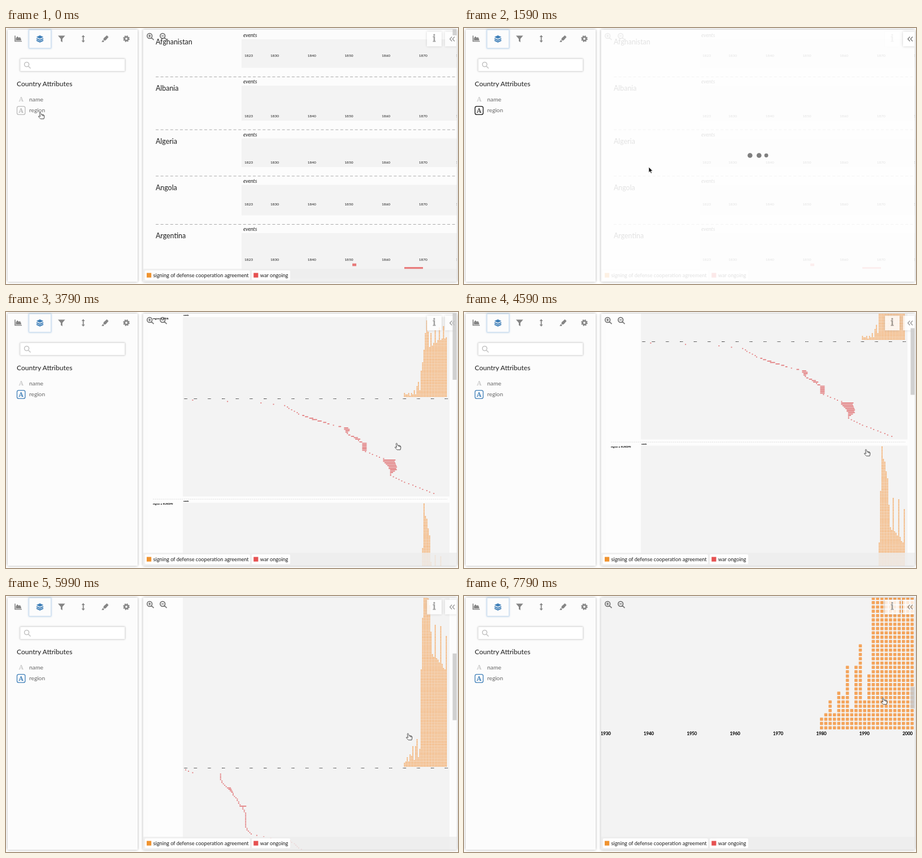
These frames come from a looping animation (800x453 px, 7.99 s). An HTML page:

```html
<!DOCTYPE html>
<html lang="en">
<head>
<meta charset="utf-8">
<title>Event timeline explorer</title>
<style>
html, body { margin: 0; width: 100%; height: 100%; overflow: hidden; background: #fff; }
svg { display: block; width: 800px; height: 453px; font-family: Quicksand, Lato, sans-serif; fill: #1c1c1c; }
.pane { fill: #fcfcfc; filter: drop-shadow(0 0 2px rgba(0,0,0,.33)); }
.button { fill: #fff; filter: drop-shadow(0 0 2px rgba(0,0,0,.2)); }
.glow { fill: #fcfcfc; stroke: #d0e1f1; filter: drop-shadow(0 0 1.5px rgba(70,135,200,.5)); }
.field { fill: #fff; stroke: #e2e2e2; filter: drop-shadow(0 0 1.5px rgba(0,0,0,.22)); }
.icon { fill: #858585; }
.line { fill: none; stroke: #858585; stroke-width: 1.6; }
.panel { fill: #f3f3f3; }
.axis { text-anchor: middle; }
.events { font-style: italic; }
.fine text { fill: #000; stroke: #000; stroke-width: .1; }
.dash { stroke: #aaa; fill: none; }
.tag { fill: #f6f6f6; stroke: #d8d8d8; stroke-width: .8; }
.letter { font: 700 11.5px "Noto Serif", serif; text-anchor: middle; }
</style>
</head>
<body>
<svg viewBox="0 0 800 453">
  <defs>
    <clipPath id="view"><rect x="243" y="3" width="555" height="446"/></clipPath>
    <clipPath id="stage"><rect width="797" height="449"/></clipPath>
  </defs>

  <rect class="pane" x="3" y="3" width="230" height="446" rx="1"/>
  <rect class="glow" x="40.8" y="3.3" width="38.8" height="32.4"/>
  <g class="icon">
    <path d="M17.5 22v-4l2.6-3.2 2.6 2.5 2-1.4 2 3.6v2.5z"/>
    <path class="line" d="M16 13.5v10h12"/>
    <g fill="#3f7fb8">
      <path d="M60 13l6.3 3-6.3 3-6.3-3z"/>
      <path d="M54 18.9l6 2.8 6-2.8M54 21.9l6 2.8 6-2.8" fill="none" stroke="#3f7fb8" stroke-width="1.9"/>
    </g>
    <path d="M92 13.5h12.6l-4.8 5.8v6l-2.8-2v-4z"/>
    <path d="M136.7 12.6l3 3.5h-2.1v6.2h2.1l-3 3.5-3-3.5h2.1v-6.2h-2.1z"/>
    <path d="M178.6 13l2.9 2.9-5 5.8-2.6.6-1.6-1.6.6-2.6zM171.4 21.2l2.4 2.4-1 1.2h-3.6z"/>
    <circle class="line" cx="213" cy="19" r="3.2" style="stroke-width:2.6"/>
    <circle class="line" cx="213" cy="19" r="5" stroke-dasharray="2.2 1.727"/>
  </g>
  <rect class="field" x="25" y="54.5" width="185.5" height="22" rx="1"/>
  <path class="line" style="stroke:#c4c4c4" d="M40.6 64.5a4 4 0 1 1-8 0a4 4 0 1 1 8 0M39.5 67.5l4 4"/>
  <g id="attributes"></g>

  <rect class="pane" x="242.5" y="3" width="555.5" height="446" rx="1"/>
  <g clip-path="url(#view)">
    <g id="countries"></g>
    <g id="regions" class="fine"></g>
    <rect x="243" y="426" width="555" height="23" fill="#eee" opacity=".8"/>
    <g id="legend"></g>
  </g>
  <g fill="none" stroke="#777" stroke-width="1.7">
    <path d="M258.6 14a4.4 4.4 0 1 1-8.8 0a4.4 4.4 0 1 1 8.8 0M257.3 17l4.2 4.2M252 14h4.4M254.2 11.8v4.4"/>
    <path d="M281.6 14a4.4 4.4 0 1 1-8.8 0a4.4 4.4 0 1 1 8.8 0M280.3 17l4.2 4.2M275 14h4.4"/>
  </g>
  <g opacity=".8">
    <rect class="button" x="745" y="6.5" width="26" height="26"/>
    <path d="M756.3 14.6h2.9v8.2h1.3v1.7h-5v-1.7h1.3v-6.2h-1.3v-2zM756.3 12.2a1.6 1.6 0 1 0 3.2 0a1.6 1.6 0 1 0-3.2 0" fill="#8c8c8c"/>
  </g>
  <g id="veil">
    <rect x="243" y="3.5" width="554.5" height="445" fill="#fff" opacity=".87"/>
    <g id="loader" fill="#7f7f7f"><circle/><circle/><circle/><circle/></g>
  </g>
  <g id="fold" clip-path="url(#stage)">
    <rect class="button" x="777" y="6.5" width="26" height="26"/>
    <path class="line" d="M789.3 15.5l-3.6 4 3.6 4M794 15.5l-3.6 4 3.6 4"/>
  </g>
  <rect id="thumb" x="790.5" width="7" fill="#c9c9c9" opacity=".85"/>
  <g id="tip"></g>
  <path id="hand" fill="#fff" stroke="#333" stroke-width=".9" stroke-linejoin="round"
    d="M-1.6 1.6C-2 0 0-.2.4 1.2L1.5 4.6Q4 3.6 5.6 4.6Q7 5.4 6.8 8L6 11.8H.4L-3.4 8.2Q-3.8 6.4-2 6.9L-.4 7.6ZM3.4 4.6v2M5.2 5v2"/>
  <path id="arrow" fill="#111" stroke="#fff" stroke-width=".7" d="M0 0V9.7L2.2 7.7 3.8 11.2 5.5 10.4 3.9 7.1H7Z"/>
</svg>

<script>
const LOOP = 7990;
const YEAR = 2.467;                       // width of a year and height of a row
const LEFT = 250.5, TOP = 2, FULL = 1703, VIEW = 448;
const el = id => document.getElementById(id);
const show = (id, on) => el(id).style.display = on ? '' : 'none';
const range = n => [...Array(n).keys()];
const noise = n => Math.abs(Math.sin(n * 12.9898) * 43758.5) % 1;

// Straight lines between key points [position, value].
function at(track, t) {
  const i = track.findIndex(k => k[0] > t);
  if (i < 0) return track[track.length - 1][1];
  if (i === 0) return track[0][1];
  const [t0, a] = track[i - 1], [t1, b] = track[i];
  return a + (b - a) * (t - t0) / (t1 - t0);
}

// Markup helpers; text is placed by its vertical centre.
const text = (x, cy, size, str, attrs = '') =>
  `<text x="${x}" y="${cy + size * .34}" font-size="${size}" ${attrs}>${str}</text>`;
const rect = (x, y, w, h, attrs = '') =>
  `<rect x="${x}" y="${y}" width="${w}" height="${h}" ${attrs}/>`;
const dashes = (x1, x2, y, unit) =>
  `<path class="dash" d="M${x1} ${y}H${x2}" stroke-width="${unit}" stroke-dasharray="${5 * unit} ${3.6 * unit}"/>`;
const axis = (first, second, step, count, y, size) =>
  text(first, y, size, 1823, 'class="axis"') +
  range(count).map(i => text(second + i * step, y, size, 1830 + i * 10, 'class="axis"')).join('');

function buildAttributes() {
  el('attributes').innerHTML =
    text(19, 98.5, 12.1, 'Country Attributes') +
    text(41, 126, 10.4, 'name', 'fill="#666"') + text(41, 145.7, 10.2, 'region', 'fill="#666"') +
    '<text class="letter" x="26.8" y="130.2" fill="#ccc">A</text>' +
    rect(19.5, 138.6, 14.4, 14.6, 'id="box" rx="3" fill="none" stroke-width="1.3"') +
    '<text class="letter" id="mark" x="26.7" y="150.1">A</text>';
}

function country(name, top, height, axisY) {
  return rect(417, top + 20, 381, height, 'class="panel"') +
    (top ? dashes(265, 797, top + 4.5, 1) : '') +
    text(265, top + 25, 12.4, name) +
    text(420, top + 13, 9, 'events', 'class="events"') +
    axis(429.5, 475.5, 65.7, 6, top + axisY, 6.5);
}

function buildCountries() {
  const war = 'fill="#e87b7b"';
  el('countries').innerHTML =
    country('Afghanistan', 0, 50.5, 48.5) + country('Albania', 82, 62, 73.3) +
    country('Algeria', 175.5, 50.5, 62) + country('Angola', 257.5, 54, 53.8) +
    country('Argentina', 343, 80, 66.7) +
    rect(613, 416.7, 7, 4.6, war) + rect(705, 423, 33, 4, war);
}

function buildLegend() {
  const item = (x, w, color, label) =>
    rect(x, 429, w, 17, 'rx="2" fill="#fff"') + rect(x + 3.2, 433.4, 8.2, 8.2, `fill="${color}"`) +
    text(x + 14.8, 437.4, 9.2, label);
  el('legend').innerHTML =
    item(245.8, 186, '#f0932f', 'signing of defense cooperation agreement') +
    item(435, 68, '#e65252', 'war ongoing');
}

// signs: count by years since 1980; every `gap` years the count jumps.
// wars: left edge by row; spans: bar width by row.
const asia = {
  name: 'ASIA', top: 0, axis: 152.8, end: 326.5, rows: 68, gap: 3, jump: 9,
  signs: [[0, 3], [6, 2], [11, 8], [12, 19], [13, 24], [16, 56], [18, 36], [30, 43]],
  wars: [[0, 330], [1, 392], [2, 451], [4, 493], [10, 518], [14, 543], [18, 579], [20, 599], [24, 603],
    [31, 631], [36, 631], [42, 667], [44, 669], [50, 681], [54, 681], [58, 700], [67, 756]],
  spans: [[10, 2], [14, 9], [18, 2], [21, 10], [24, 2], [28, 9], [29, 2], [31, 8], [36, 8], [37, 2], [42, 2], [43, 22], [50, 12], [53, 2]]
};
const europe = {
  name: 'EUROPE', top: 328.5, axis: 683.6, end: 1080, rows: 100, gap: 4, jump: 25,
  signs: [[0, 4], [11, 14], [12, 68], [13, 108], [14, 138], [18, 115], [20, 79], [30, 70]],
  wars: [[0, 317], [2, 330], [3, 379], [9, 381], [13, 392], [20, 407], [26, 414], [27, 418], [31, 423], [41, 423],
    [46, 433], [49, 468], [50, 500], [56, 518], [60, 538], [66, 543], [75, 543], [78, 552], [92, 556], [95, 579], [99, 604]],
  spans: [[12, 2], [13, 7], [17, 2], [25, 2], [26, 12], [27, 2], [65, 2], [66, 9], [75, 9], [76, 2], [81, 5], [90, 2]]
};

function signCount({ signs, gap, jump }, i) {
  const shake = (noise(i + gap) - .5) * (i < 12 ? 1.3 : .06);
  const spike = i > 18 && (i - 22) % gap === 0 ? jump : 0;
  return Math.round(at(signs, i) * (1 + shake) + spike);
}

function signDots(place) {
  return range(31).map(i => range(signCount(place, i)).map(k =>
    `M${(704.7 + i * YEAR).toFixed(2)} ${(place.axis - 4.05 - k * YEAR).toFixed(2)}h1.3v1.3h-1.3z`).join('')).join('');
}

// Bars begin on whole years, which gathers neighbouring rows into stacks.
function warBars({ rows, wars, spans, axis }) {
  return range(rows).map(row => {
    const x = 705 + Math.round((at(wars, row) - 705) / YEAR) * YEAR - .6;
    const w = at(spans, row);
    return `M${x} ${axis + 2.2 + row * YEAR}h${w}v1.75h-${w}z`;
  }).join('');
}

function region(place) {
  const { name, top, end } = place;
  return rect(313, top + 9, 472, end - top - 9, 'class="panel"') +
    dashes(260, 781, end + 4.7, .4) +
    text(260, top + 11, 4.6, 'region = ' + name) +
    text(314.3, top + 6.3, 3.4, 'events', 'class="events"') +
    `<path d="${signDots(place)}" fill="#f4a45b" stroke="#f4a45b" stroke-width=".5" stroke-linejoin="round"/>` +
    `<path d="${warBars(place)}" fill="#e27c7e"/>` +
    axis(318, 335.2, YEAR * 10, 19, place.axis, 2.5);
}

function buildTip() {
  const row = (x, y, label, value, w, size = 7.4) =>
    text(x, y, 7.3, label + ':', 'text-anchor="end"') + rect(x + 8.5, y - 6, w, 12, 'class="tag" rx="1.5"') +
    text(x + 8.5 + w / 2, y, size, value, 'text-anchor="middle"');
  el('tip').innerHTML =
    rect(498, 194, 237.5, 80.5, 'fill="#fff" style="filter:drop-shadow(0 0 2px rgba(0,0,0,.35))"') +
    text(562.5, 211, 7.3, 'eventName:', 'text-anchor="end"') +
    rect(571, 205, 154, 12, 'rx="1.5" fill="#fffaf4" stroke="#f3b679" stroke-width=".8"') +
    text(648, 211, 7.8, 'signing of defense cooperation agreement', 'text-anchor="middle" font-weight="700" fill="#ee9640"') +
    row(562.5, 226.5, 'startYear', 1994, 20, 6.5) + row(671.5, 226.5, 'endYear', 1994, 19, 6.5) +
    row(562.5, 242.3, 'signWithCountry', 'Malaysia', 35) + row(671.5, 242.3, 'type', 'general', 30) +
    row(562.5, 258, 'category', 'DCA', 20, 6.9);
}

buildAttributes();
buildCountries();
buildLegend();
buildTip();
el('regions').innerHTML = rect(251, 2, 537, FULL, 'fill="#fdfdfd"') + region(asia) + region(europe);

// The picture moves every 200 ms within these runs of [start, steps].
const runs = [[0, 1], [160, 6], [1390, 4], [2160, 1], [2590, 13], [5160, 1], [5390, 2], [5990, 1], [6390, 4], [7160, 1], [7390, 3]];
const steps = runs.flatMap(([t, n]) => range(n).map(i => t + i * 200));

const keys = {
  scale: [[2160, 2.665], [2590, 2.4], [3590, 1.08], [3790, 1], [7390, 1], [7590, 1.76], [7790, 3.095]],
  scroll: [[3790, 0], [5160, 173], [5590, 325], [5990, 379], [6790, 483]],
  x: [[360, 61], [1390, 327], [1790, 327], [2590, 692], [3790, 692], [4190, 712], [5990, 712], [6790, 742]],
  y: [[360, 149], [1390, 246], [1790, 246], [2590, 232], [3790, 232], [4190, 243], [5990, 243], [6790, 180]],
  veil: [[160, 0], [560, 1], [1790, 1], [1990, 0]]
};

// The first dot grows, two slide on by one place, the last shrinks.
function drawLoader(t) {
  const p = (t / 600 + .55) % 1;
  const places = [[0, p], [p, 1], [1 + p, 1], [2, 1 - p]];
  [...el('loader').children].forEach((dot, i) => {
    dot.setAttribute('cx', 503 + places[i][0] * 16);
    dot.setAttribute('cy', 225.5);
    dot.setAttribute('r', 4.3 * places[i][1]);
  });
}

function drawView(t, loaded) {
  const s = at(keys.scale, t), scroll = at(keys.scroll, t);
  const [cx, cy] = t < 7390 ? [LEFT, TOP] : [740, 180];
  const top = cy + s * (TOP - scroll - cy);
  el('regions').setAttribute('transform', `translate(${cx * (1 - s)} ${cy * (1 - s) - s * scroll}) scale(${s})`);
  el('thumb').setAttribute('y', TOP + (TOP - top) * VIEW / (FULL * s));
  el('thumb').setAttribute('height', loaded ? 118 / s : 11);
}

function draw(t) {
  const loaded = t >= 1990, veil = at(keys.veil, t);
  const pick = t < 160 ? '#bbb' : loaded ? '#3f7fb8' : '#111';
  show('countries', !loaded);
  show('regions', loaded);
  show('tip', t >= 6990 && t < 7390);
  drawView(t, loaded);
  drawLoader(t);
  el('veil').setAttribute('opacity', veil);
  el('thumb').style.visibility = veil > 0 ? 'hidden' : '';
  el('fold').setAttribute('opacity', veil > 0 ? 1 : .75);
  el('box').setAttribute('stroke', pick);
  el('mark').setAttribute('fill', pick === '#111' ? '#444' : pick);

  const arrow = t >= 560 && t < 2590;
  show('hand', !arrow);
  show('arrow', arrow);
  el(arrow ? 'arrow' : 'hand').setAttribute('transform', `translate(${at(keys.x, t)} ${at(keys.y, t)})`);
}

const start = performance.now();
let last = -1;
function tick() {
  const t = (performance.now() - start) % LOOP;
  const step = steps.filter(s => s <= t).pop();
  if (step !== last) draw(last = step);
  requestAnimationFrame(tick);
}
tick();
</script>
</body>
</html>
```
